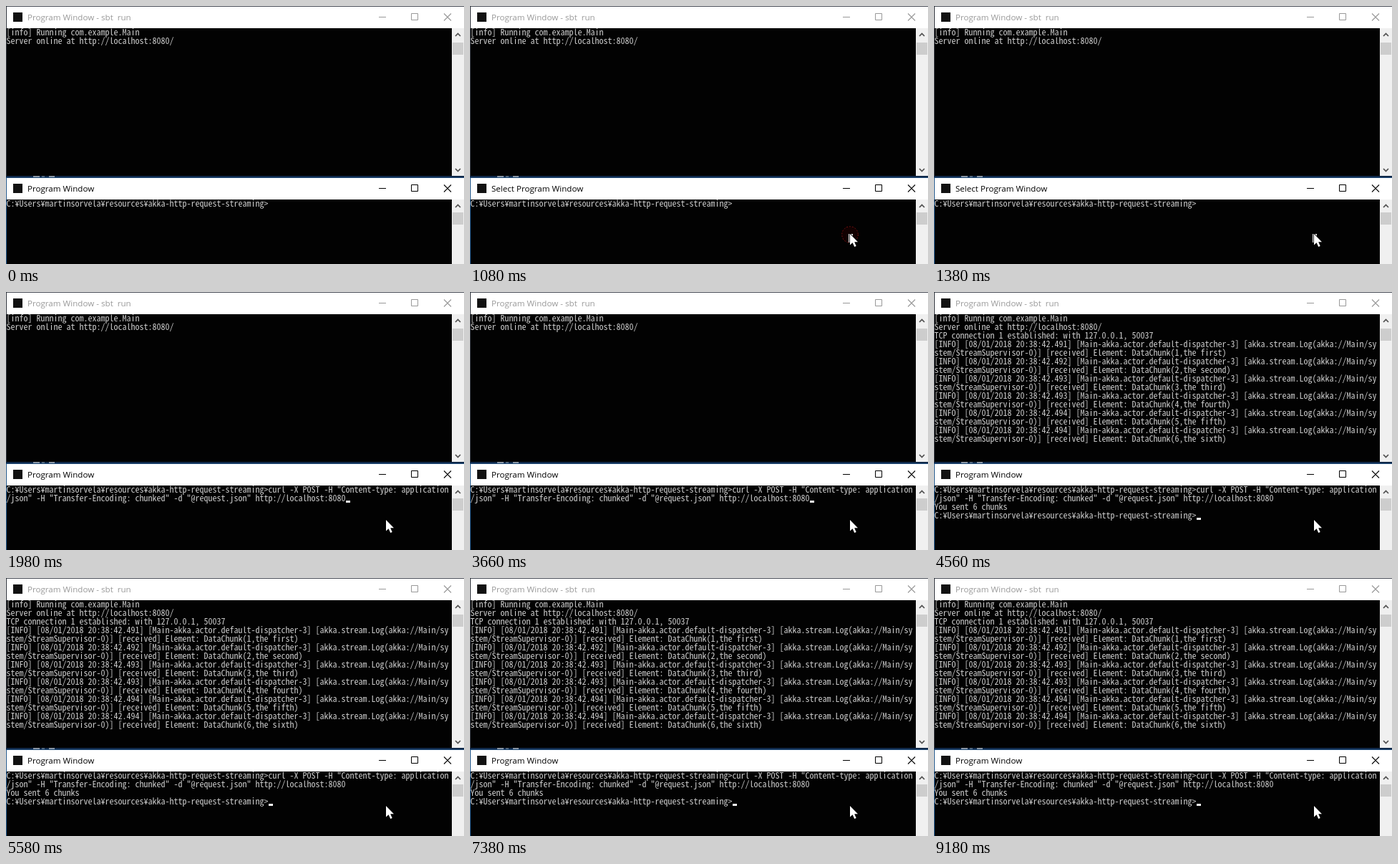
An HTML page that plays this animation: 640 px wide and 360 px high, repeating every 9420 ms.

```html
<!DOCTYPE html>
<html lang="en">
<head>
<meta charset="utf-8">
<title>Two console windows</title>
<style>
  html, body { margin: 0; width: 100%; height: 100%; overflow: hidden; background: #000; }
  svg { display: block; width: 640px; height: 360px; }
  text { white-space: pre; }
  .title { font: 11.6px "Open Sans", "Noto Sans", sans-serif; }
  .mono { fill: #cfcfcf; font: 12px "Noto Sans Mono CJK JP", monospace; font-kerning: none; font-variant-ligatures: none; }
  .mono.narrow { font: 10px "Liberation Mono", monospace; }
</style>
</head>
<body>
<svg id="stage" viewBox="0 0 640 360" xmlns="http://www.w3.org/2000/svg"></svg>
<script>
const LOOP = 9420;
const NAME = 'Program Window';
const PROMPT = 'C:¥Users¥martinsorvela¥resources¥akka-http-request-streaming>';
const CURL = ['curl -X POST -H "Content-type: application',
  '/json" -H "Transfer-Encoding: chunked" -d "@request.json" http://localhost:8080'];
const CURL_TITLE = NAME + ' - curl  -X POST -H "Content-type: application/json" -H "Transfer-En...';

// Moments of the story, in ms
const T = {
  enter: 660, arrive: 960, press: 1020, ringEnd: 1320, deselect: 1440,
  paste: 1860, run: 3720, connect: 4020, log: 4320, reply: 4440, done: 4500
};

const stage = document.getElementById('stage');

function add(tag, attrs) {
  const el = document.createElementNS('http://www.w3.org/2000/svg', tag);
  for (const k in attrs) el.setAttribute(k, attrs[k]);
  return stage.appendChild(el);
}
const rect = (x, y, width, height, fill) => add('rect', { x, y, width, height, fill });
const line = (d, stroke, w = 1) => add('path', { d, stroke, fill: 'none', 'stroke-width': w });
const show = (el, on) => el.setAttribute('visibility', on ? 'visible' : 'hidden');
function setText(el, s) { if (el.textContent !== s) el.textContent = s; }

// Use the half-width face when it gives 6px cells, otherwise a 10px one
const probe = document.createElement('canvas').getContext('2d');
probe.font = '12px "Noto Sans Mono CJK JP", monospace';
const monoClass = Math.abs(probe.measureText('C:¥il').width - 30) < 0.5 ? 'mono' : 'mono narrow';

function titleBar(y, ink) {
  const mid = y + 15, b = mid - 0.5;
  rect(0, y, 640, 30, '#fff');
  rect(10, mid - 7, 13, 13, '#111');
  const label = add('text', { class: 'title', x: 30, y: mid + 4, fill: ink });
  line(`M521 ${b}h10`, ink);
  line(`M566.5 ${b - 5}h9v9h-9z`, ink);
  line(`M612 ${b - 5}l10 10M622 ${b - 5}l-10 10`, ink, 1.1);
  return label;
}

function scrollBar(y, h, thumb) {
  rect(623, y, 17, h, '#f0f0f0');
  rect(624, thumb, 15, 17, '#cdcdcd');
  line(`M628 ${y + 11}l3.5 -3.5l3.5 3.5`, '#505050', 1.7);
}

function rows(count, baseline) {
  return Array.from({ length: count }, (_, i) =>
    add('text', { class: monoClass, x: 0.5, y: baseline + 12 * i }));
}

// Upper window
rect(0, 0, 640, 360, '#020202');
const topTitle = titleBar(1, '#999');
setText(topTitle, NAME + ' - sbt  run');
rect(0, 0, 640, 1, '#4a4f58');
rect(0, 0, 1, 237, '#30343c');
scrollBar(31, 206, 51);
line('M628 227l3.5 3.5l3.5 -3.5', '#505050', 1.7);
const topRows = rows(15, 41);

// Desktop strip between the windows
rect(0, 237, 640, 3, '#10294a');
rect(38, 237, 9, 2, '#8996a6');
rect(50, 237, 4, 2, '#53687f');
rect(60, 237, 8, 2, '#8996a6');

// Lower window
const lowTitle = titleBar(240, '#000');
rect(0, 239, 640, 1, '#1d4a78');
rect(0, 240, 1, 120, '#23588c');
scrollBar(270, 90, 288);
const lowRows = rows(4, 280);
const caret = rect(0, 0, 6, 3, '#f2f2f2');

// Mouse pointer with its click ring and selected cell
const ring = add('circle', { cx: 531, cy: 319, fill: '#500', 'fill-opacity': 0.3,
  stroke: '#b01818', 'stroke-dasharray': '2 2' });
const cell = rect(529, 318, 6, 12, '#e8e8e8');
const mouse = add('path', { d: 'M0 0V15.5L3.6 12.2L6.2 18L8.7 16.9L6.2 11.3H11Z',
  fill: '#fff', stroke: '#000', 'stroke-width': 1.6, 'paint-order': 'stroke' });

const MILLIS = [491, 492, 493, 493, 494, 494];
const LOGS = ['first', 'second', 'third', 'fourth', 'fifth', 'sixth'].flatMap((word, i) => [
  `[INFO] [08/01/2018 20:38:42.${MILLIS[i]}] [Main-akka.actor.default-dispatcher-3] [akka.stream.Log(akka://Main/sy`,
  `stem/StreamSupervisor-0)] [received] Element: DataChunk(${i + 1},the ${word})`
]);

function topText(t) {
  const out = ['[info] Running com.example.Main', 'Server online at http://localhost:8080/'];
  if (t >= T.connect) out.push('TCP connection 1 established: with 127.0.0.1, 50037');
  return t >= T.log ? out.concat(LOGS) : out;
}

function lowText(t) {
  if (t < T.paste) return [PROMPT];
  const out = [PROMPT + CURL[0], CURL[1]];
  if (t >= T.reply) out.push('You sent 6 chunks');
  if (t >= T.done) out.push(PROMPT);
  return out;
}

function titleText(t) {
  if (t >= T.press && t < T.deselect) return 'Select ' + NAME;
  return t >= T.run && t < T.done ? CURL_TITLE : NAME;
}

function placeCaret(t) {
  let col = CURL[1].length, row = 1;
  if (t >= T.run) [col, row] = [0, 2];
  if (t >= T.reply) row = 3;
  if (t >= T.done) col = PROMPT.length;
  caret.setAttribute('x', 1 + 6 * col);
  caret.setAttribute('y', 279 + 12 * row);
  show(caret, t >= T.paste);
}

function placeMouse(t) {
  const p = Math.min(1, Math.max(0, (t - T.enter) / (T.arrive - T.enter)));
  const e = 1 - (1 - p) ** 2;
  mouse.setAttribute('transform', `translate(${636 - 105 * e} ${300 + 18 * e})`);
  show(mouse, t >= T.enter);
  show(cell, t >= T.press && t < T.deselect);
  const k = (t - T.arrive) / (T.ringEnd - T.arrive);
  const on = k >= 0 && k < 1;
  show(ring, on);
  if (on) {
    ring.setAttribute('r', 6 + 16 * k);
    ring.setAttribute('opacity', 1 - k);
  }
}

function draw(t) {
  const top = topText(t), low = lowText(t);
  topRows.forEach((el, i) => setText(el, top[i] || ''));
  lowRows.forEach((el, i) => setText(el, low[i] || ''));
  setText(lowTitle, titleText(t));
  placeCaret(t);
  placeMouse(t);
}

const start = performance.now();
function tick() {
  const t = (performance.now() - start) % LOOP;
  draw(Math.floor(t / 60) * 60);
  requestAnimationFrame(tick);
}
draw(0);
requestAnimationFrame(tick);
</script>
</body>
</html>
```
